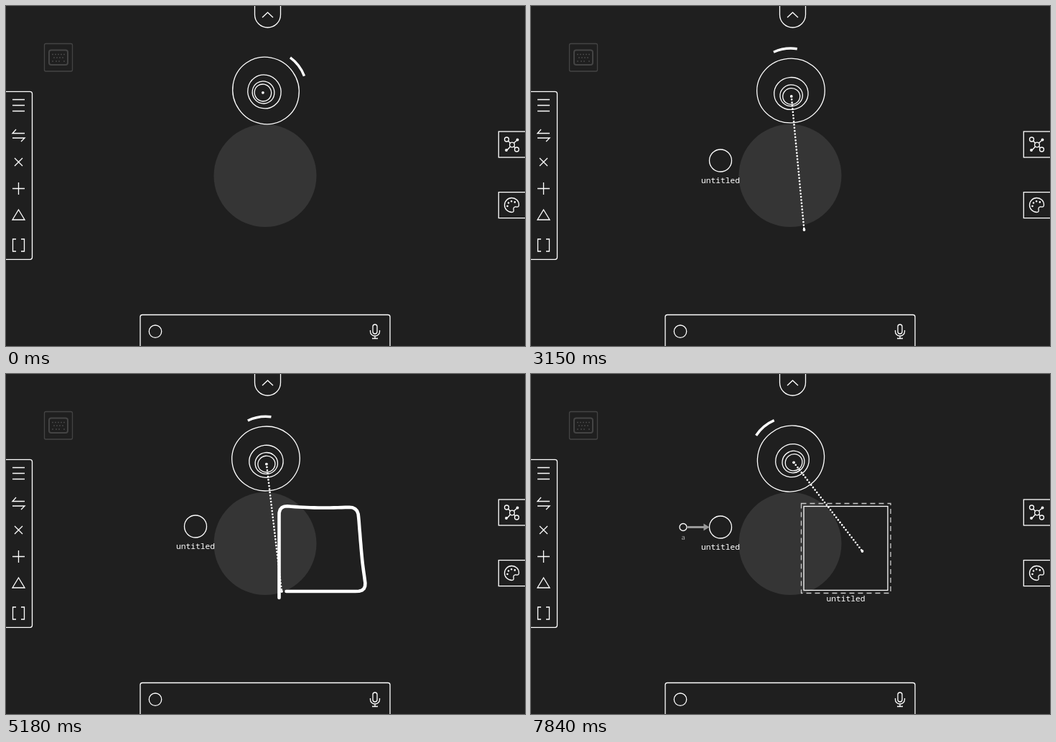
An HTML page that plays this animation: 723x474 px, repeating every 8 s.

```html
<!DOCTYPE html>
<html lang="en">
<head>
<meta charset="utf-8">
<title>Sketching nodes</title>
<style>
  html, body { margin: 0; width: 100%; height: 100%; overflow: hidden; background: #1f1f1f; }
  svg { display: block; }
  text { font: 11.3px "Noto Sans Mono", monospace; fill: #fff; stroke: none; text-anchor: middle; }
  .dim { stroke: #444; }
  .solid { fill: #fff; stroke: none; }
  .dash { stroke: #ccc; stroke-dasharray: 7 5; }
  .pen { stroke-width: 4.6; stroke-linecap: round; stroke-linejoin: round; }
</style>
</head>
<body>
<svg width="723" height="474" viewBox="0 0 723 474" fill="none" stroke="#fff" stroke-width="1.3">
  <circle cx="361" cy="236.5" r="71.5" fill="#353535" stroke="none"/>

  <path d="M346.5-2V12a18 18 0 0 0 36 0V-2M357 16l7.500-7 7.500 7"/>

  <g class="dim">
    <rect x="53.5" y="52.5" width="39" height="38.5" rx="2"/>
    <rect x="60" y="61.5" width="26" height="20.5" rx="3" stroke-width="2"/>
    <path d="M64 67.5h18M66 72h14M64 77h2M69 77h8M80 77h2" stroke-width="1.6" stroke-dasharray="2 2"/>
  </g>

  <rect x="-6" y="119.3" width="42.5" height="234" rx="3"/>
  <path d="M9 130.5h17m-17 8h17m-17 8h17"/>
  <path d="M14 172l-5 5.5h17M9 184h17l-5 5"/>
  <path d="M12 212l11 11m0-11l-11 11M9 254.5h17m-8.5-8.5v17M17.5 284l8.5 14H9z"/>
  <path d="M14 325H9.5v17H14M21 325h4.5v17H21"/>

  <rect x="686.3" y="175" width="44" height="36"/>
  <circle cx="705" cy="193.5" r="3.4"/>
  <circle cx="697.5" cy="186" r="3"/>
  <circle cx="711.5" cy="200" r="3"/>
  <path d="M699.7 188.2l3 3m4.6 4.6l2 2M712 187l-4.500 4M698 201l4.500-5"/>
  <circle class="solid" cx="712.5" cy="186.5" r="1.9"/>
  <circle class="solid" cx="697" cy="201" r="1.9"/>

  <rect x="686.3" y="259.6" width="44" height="36"/>
  <path d="M704.5 267.5a10 10 0 0 0 0 20c3 0 3-2 2.500-4-.5-3 2-4 4-3.500 3 .5 3.500-1 3.500-3a10 9.500 0 0 0-10-9.500z"/>
  <path d="M698.5 279A6.500 6.500 0 0 1 710 274.500" stroke-width="2.6" stroke-linecap="round" stroke-dasharray="0 4.800"/>

  <rect x="187" y="430.5" width="348" height="60" rx="3"/>
  <circle cx="208" cy="453.7" r="8.7"/>
  <rect x="511" y="444" width="6" height="13" rx="3"/>
  <path d="M507.5 452v2a6.500 6 0 0 0 13 0v-2M514 460v3.500m-4 0h8"/>

  <g id="node">
    <circle r="15.5"/>
    <circle id="nodeHover" class="dash" r="19.5"/>
    <text y="31">untitled</text>
  </g>
  <g id="box">
    <rect x="380" y="184.5" width="117" height="117"/>
    <rect id="boxHover" class="dash" x="376.5" y="180.5" width="124.5" height="125"/>
    <text x="438.5" y="316.5">untitled</text>
  </g>
  <g id="link">
    <path d="M218 213.5h24" stroke="#999" stroke-width="3"/>
    <path d="M240.5 208.5l8 5-8 5z" fill="#999" stroke="none"/>
    <circle cx="212" cy="213.5" r="5"/>
    <text x="212" y="231" style="font-size:9.5px;fill:#aaa">a</text>
  </g>

  <circle id="ripple"/>
  <polyline id="stroke" class="pen"/>
  <g id="eye"></g>
  <path id="arc" stroke-width="3.5"/>
  <path id="beam" stroke-width="2.7" stroke-linecap="round" stroke-dasharray="0 4.4"/>
  <circle id="pupil" class="solid" r="1.9"/>
  <circle id="tip" class="solid" r="1.9"/>
</svg>
<script>
const LOOP = 8000, STEP = 70, LAST = 7840;
const EYE = { x: 362, y: 118 };
const SVG = "http://www.w3.org/2000/svg";

const linear = f => f;
const easeOut = f => 1 - (1 - f) ** 2;

// Each move follows a path; those with a ripple draw while the button is down.
const moves = [
  { from: 460, to: 1880, press: 70, release: 1960, ripple: 78,
    d: "M262 188C246 192 231 217 234 232C236 240 266 244 290 242C304 226 288 188 264 187" },
  { from: 2380, to: 3080, d: "M264 187L380.5 312" },
  { from: 3400, to: 5160, press: 3150, release: 5320, ripple: 102,
    d: "M380.5 312V183Q430 189 490 185L496 259L502 303H384" },
  { from: 5600, to: 6090, ease: easeOut, d: "M384 303L240 240L207 236" },
  { from: 6510, to: 7040, press: 6230, release: 7140, ripple: 77, d: "M207 236L262 212" },
  { from: 7350, to: 7770, press: LAST, release: LOOP, d: "M262 212L461.5 247" }
];

const el = id => document.getElementById(id);
const make = tag => document.createElementNS(SVG, tag);
const set = (node, attrs) => { for (const k in attrs) node.setAttribute(k, attrs[k]); };
const show = (id, on) => { el(id).style.display = on ? "" : "none"; };
const ramp = (t, a, b) => Math.min(1, Math.max(0, (t - a) / (b - a)));

for (const move of moves) {
  move.path = make("path");
  set(move.path, { d: move.d });
  move.length = move.path.getTotalLength();
}

// radius and share of the pupil's offset
const rings = [[47.3, 0], [23.7, .5], [15.7, .85], [12, 1]].map(([r, share]) =>
  ({ r, share, node: el("eye").appendChild(make("ellipse")) }));

function pointer(t) {
  const move = moves.filter(m => t >= m.from).pop() || moves[0];
  const f = (move.ease || linear)(ramp(t, move.from, move.to));
  return move.path.getPointAtLength(f * move.length);
}

// The ink trails the pointer by averaging its last 80 ms.
function ink(t) {
  let x = 0, y = 0;
  for (let i = 0; i < 5; i++) {
    const p = pointer(t - i * 20);
    x += p.x / 5;
    y += p.y / 5;
  }
  return x.toFixed(1) + "," + y.toFixed(1);
}

function drawEye(x, y, pressed) {
  const dx = x - EYE.x, dy = y - EYE.y, dist = Math.hypot(dx, dy), dir = Math.atan2(dy, dx);
  const ox = dx * .041, oy = dy * .041, px = EYE.x + ox, py = EYE.y + oy;
  for (const { r, share, node } of rings) {
    const place = `translate(${EYE.x + ox * share} ${EYE.y + oy * share})`;
    set(node, { rx: r * (1 - dist * .00027), ry: r, transform: `${place} rotate(${dir * 180 / Math.PI})` });
  }
  const r = 54.6 + dist * .022, back = dir + Math.PI - .04;
  const rim = a => `${EYE.x + r * Math.cos(a)} ${EYE.y + r * Math.sin(a)}`;
  set(el("arc"), { d: `M${rim(back - .285)}A${r} ${r} 0 0 1 ${rim(back + .285)}` });
  set(el("pupil"), { cx: px, cy: py });
  set(el("tip"), { cx: x, cy: y });
  set(el("beam"), { d: `M${px} ${py}L${x} ${y}` });
  show("tip", pressed);
  show("beam", pressed);
}

function drawInk(t, move) {
  show("stroke", move);
  show("ripple", move && t < move.from + 280);
  if (!move) return;
  const points = [];
  for (let s = move.from; s < t; s += 20) points.push(ink(s));
  points.push(ink(t));
  set(el("stroke"), { points: points.join(" ") });
  const f = ramp(t, move.from, move.from + 210);
  const { x, y } = pointer(move.from);
  set(el("ripple"), { cx: x, cy: y, r: move.ripple * f, opacity: Math.max(.15, 1 - f) });
}

function render(t) {
  const { x, y } = pointer(t);
  const held = moves.find(m => t >= m.press && t < m.release);
  const drawing = held && held.ripple && t > held.from ? held : null;
  const nodeY = 214 + 1.5 * ramp(t, 2450, 3080) - 3 * ramp(t, 3430, 3900) + ramp(t, 6580, 7200);

  show("node", t >= moves[0].release);
  show("box", t >= moves[2].release);
  show("link", t >= moves[4].release);
  set(el("node"), { transform: `translate(264 ${nodeY})` });
  show("nodeHover", !drawing && Math.hypot(x - 264, y - nodeY) < 18);
  show("boxHover", !drawing && x > 376 && x < 501 && y > 180 && y < 306);

  drawInk(t, drawing);
  drawEye(x, y, !!held);
}

const start = performance.now();
let shown = -1;
function loop() {
  const time = (performance.now() - start) % LOOP;
  const t = Math.min(LAST, Math.floor(time / STEP) * STEP);
  if (t !== shown) render(shown = t);
  requestAnimationFrame(loop);
}
loop();
</script>
</body>
</html>
```
